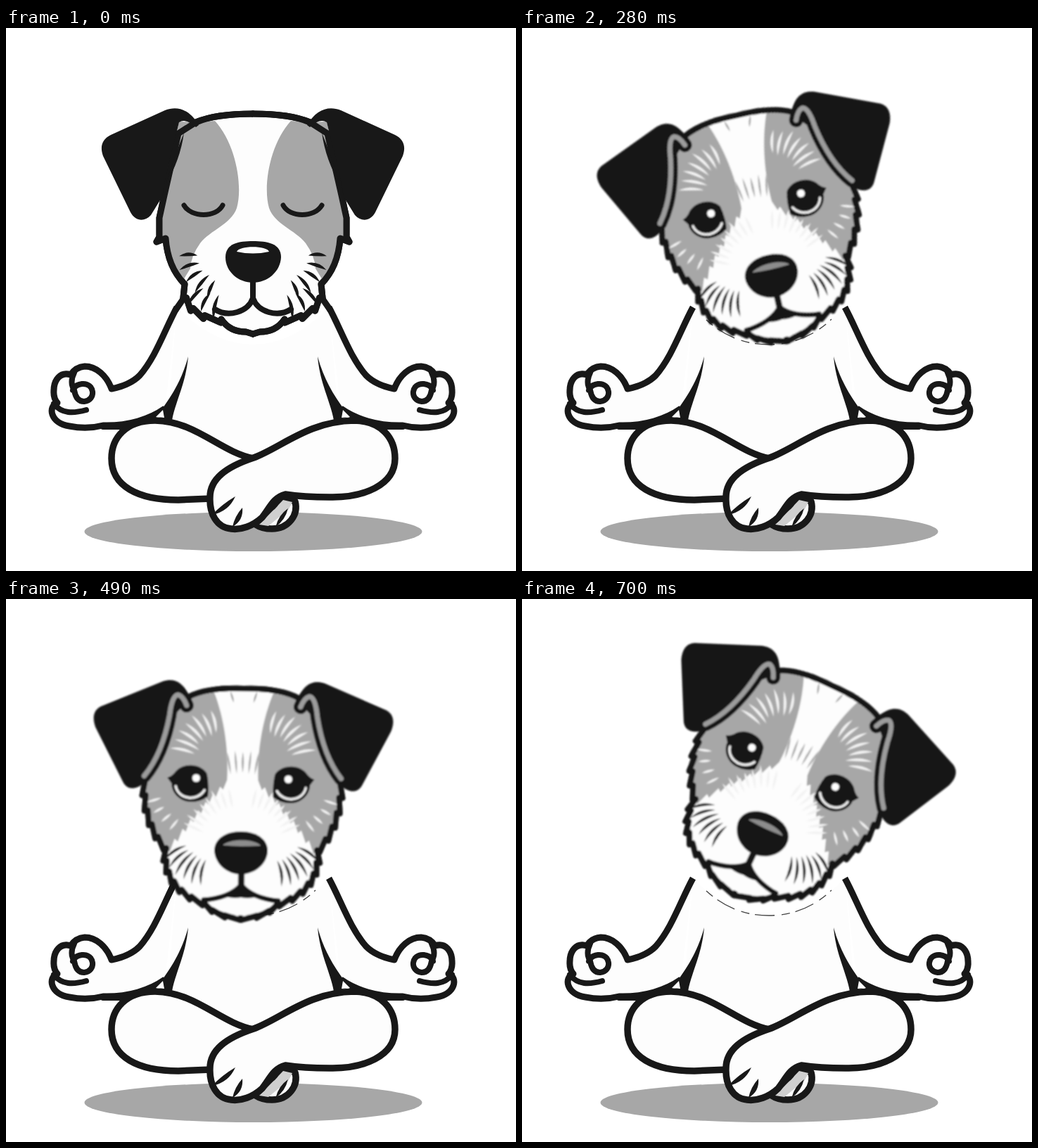
Recreate the animation shown at these times as an HTML page. Size 725 by 772 pixels, loop 770 ms.

```html
<!DOCTYPE html>
<html lang="en">
<head>
<meta charset="utf-8">
<title>Meditating dog</title>
<style>
html, body { margin: 0; height: 100%; overflow: hidden; background: #fff; }
svg { display: block; width: 100vw; height: 100vh; }
</style>
</head>
<body>
<svg id="stage" viewBox="0 0 725 772"></svg>
<script>
const INK = '#181818', FUR = '#fdfdfd', GREY = '#a7a7a7';

const fill = (d, color = INK) => `<path d="${d}" fill="${color}"/>`;
const line = (d, width = 9, color = INK, inside = 'none', cap = 'round') =>
  `<path d="${d}" fill="${inside}" stroke="${color}" stroke-width="${width}" stroke-linejoin="round" stroke-linecap="${cap}"/>`;
const mirror = (half, sum = 702) => `<g transform="matrix(-1 0 0 1 ${sum} 0)">${half}</g>`;
const both = (half, sum) => half + mirror(half, sum);

let seed = 7;
const jitter = size => {
  seed = seed * 16807 % 2147483647;
  return (seed / 2147483647 - 0.5) * size;
};

// One hair, pointed at both ends.
function hair(x, y, X, Y, width, bend = 0) {
  const len = Math.hypot(X - x, Y - y), nx = (y - Y) / len, ny = (X - x) / len;
  const via = k => `${(x + X) / 2 + nx * k} ${(y + Y) / 2 + ny * k}`;
  return `M${x} ${y}Q${via(bend + width)} ${X} ${Y}Q${via(bend - width)} ${x} ${y}Z`;
}

// Hairs spread around (x, y) between two radii and two angles in degrees.
function fan(x, y, inner, outer, from, to, count, width, color = INK, bend = 0) {
  let d = '';
  for (let i = 0; i < count; i++) {
    const a = (from + (to - from) * i / (count - 1)) * Math.PI / 180;
    const r = inner + jitter(6), R = outer + jitter(8);
    d += hair(x + r * Math.cos(a), y + r * Math.sin(a), x + R * Math.cos(a), y + R * Math.sin(a), width, bend);
  }
  return fill(d, color);
}

// Quadratic curve with teeth on its left-hand normal.
function ragged(x0, y0, cx, cy, x1, y1, teeth, depth) {
  let d = '';
  for (let i = 1; i <= teeth; i++) {
    const t = i / teeth, u = 1 - t;
    const x = u * u * x0 + 2 * u * t * cx + t * t * x1, y = u * u * y0 + 2 * u * t * cy + t * t * y1;
    const dx = u * (cx - x0) + t * (x1 - cx), dy = u * (cy - y0) + t * (y1 - cy), len = Math.hypot(dx, dy);
    d += `L${x - dy / len * depth} ${y + dx / len * depth}L${x} ${y}`;
  }
  return d;
}

function body() {
  const arm =
    line('M243 397C226 428 213 468 190 494Q176 508 150 513C143 494 128 481 112 481Q99 482 92 493C77 488 68 501 68 515Q67 526 73 533C59 538 63 562 90 566Q115 571 138 565C174 566 205 556 226 541', 9, INK, FUR, 'butt') +
    line('M97 490Q90 504 97 515C99 527 104 531 111 531C129 529 126 504 108 506Q98 507 95 515', 8) +
    line('M68 534C79 549 96 548 114 543', 8) +
    line('M138 567L175 567', 8) +
    fill('M259 467C251 497 237 522 219 545L217 553L236 558C240 533 256 505 259 467Z') +
    fill('M213 553L223 543L225 554Z', FUR);
  return `<ellipse cx="351.5" cy="716" rx="240" ry="28" fill="${GREY}"/>` +
    fill('M243 397Q295 450 351 450Q407 450 459 397L476 590L351 640L227 590Z', FUR) + both(arm) +
    line('M352 612C305 603 270 559 212 558C170 558 150 583 150 612C150 651 187 671 245 671L292 669', 9.5, INK, FUR) +
    line('M396 668L411 673C416 692 402 712 378 712Q364 712 355 706Z', 9.5, INK, FUR) +
    fill('M394 671L407 674L402 684L373 708L360 706Z', '#cfcfcf') +
    fan(430, 640, 55, 80, 124, 140, 2, 6) +
    line('M290 667C290 641 313 624 352 611C392 596 430 559 495 558C535 559 553 584 553 612C553 650 508 668 460 667C430 667 410 665 397 663C380 667 374 684 364 696C351 708 334 714 320 712C299 710 289 690 290 667Z', 9.5, INK, FUR) +
    fill(hair(293, 692, 326, 666, 7, 4) + hair(322, 709, 336, 682, 7, 3));
}

function calmHead() {
  const outline = 'M351 122C320 122 291 125 270 134L245 150L225 238L218 270V297L214 304L227 299Q230 340 254 364' +
    ragged(254, 364, 252, 408, 306, 414, 4, 5) + 'Q318 432 341 432L351 435';
  const half =
    line('M257 378L241 401') + line(outline, 9, INK, FUR) +
    fill('M297 132C327 165 337 225 328 256C320 279 291 287 276 306Q263 324 262 342L251 360C237 338 230 318 227 297L219 299L223 240L246 133L270 134Z', GREY) +
    line(outline) +
    fill('M274 138C261 116 244 110 226 117L149 152C137 158 133 168 138 182L177 262C184 275 197 276 206 266L222 240C228 200 238 168 246 134Q256 128 270 141Z') +
    fill(hair(253, 149, 227, 222, 5, -3)) +
    line('M253 252C263 270 299 270 308 252', 7) +
    line('M351 360V384C344 404 316 412 297 400', 8) +
    fan(312, 322, 38, 68, 112, 178, 5, 5, INK, 4) +
    fan(312, 335, 46, 80, 102, 132, 3, 5, INK, 5);
  return both(half) +
    fill('M351 303C371 303 391 306 391 326C390 347 371 362 351 362C331 362 312 347 312 326C312 306 331 303 351 303Z') +
    fill('M328 318C331 309 371 309 374 318Q351 323 328 318Z', FUR);
}

function alertHead() {
  const cheek = ragged(213, 252, 211, 312, 244, 350, 5, 5);
  const side = 'M351 122C321 121 293 124 272 135L248 160L213 252' + cheek +
    ragged(244, 350, 241, 406, 298, 426, 6, 5) + ragged(298, 426, 315, 446, 351, 448, 3, 3);
  const rim = 'M211 248C232 222 241 190 246 161Q249 132 258 132Q265 134 270 147';
  const eye =
    fill('M244 250Q250 248 254 243C264 228 290 228 300 243Q304 258 302 276Q287 287 270 283C257 279 250 268 250 258Z') +
    line('M256 262C260 281 287 284 297 267', 3.5, '#eee');
  const half = line(side, 8, INK, FUR) +
    fill('M309 128C322 160 331 205 329 252' + ragged(329, 252, 290, 290, 244, 352, 8, -6) +
      'Q211 312 213 252L250 150L272 136Z', GREY) +
    line(side, 8) +
    fill('M276 138C265 113 252 108 236 113L148 150C137 156 136 167 141 180L181 257C186 267 196 268 206 262L226 238Q246 200 252 145Z') +
    line(rim, 20) + line(rim, 7, '#9c9c9c') +
    fan(322, 224, 38, 74, 192, 256, 7, 4, '#f3f3f3', 4) +
    fan(300, 258, 66, 86, 128, 162, 4, 3.5, '#f3f3f3') +
    fan(350, 352, 62, 92, 205, 258, 8, 4, '#f3f3f3') +
    fan(351, 340, 98, 130, 260, 270, 3, 3, '#aaa') +
    fill(hair(332, 126, 337, 142, 3), '#aaa') +
    line('M350 384V402Q334 420 298 423', 7) +
    fill('M351 398L329 418Q340 421 351 419Z') +
    line('M299 427Q319 443 342 446', 4) +
    fan(308, 322, 42, 82, 100, 146, 6, 4, INK, 6);
  const glint = x => `<circle cx="${x}" cy="250" r="5.5" fill="#fff"/>`;
  return both(half) + both(eye, 697) + glint(285) + glint(416) +
    fill('M350 325C374 325 389 337 388 354C386 374 367 386 350 386C331 386 314 373 312 353C312 336 328 325 350 325Z') +
    fill('M324 345C334 335 370 335 378 345Q350 347 324 345Z', '#8c8c8c');
}

const stage = document.getElementById('stage');
stage.innerHTML = '<defs><filter id="soft"><feGaussianBlur stdDeviation="1"/></filter></defs>' + body() +
  `<g id="calm">${calmHead()}</g><g id="awake">` +
  '<path d="M262 415Q300 450 351 450Q402 450 440 414" fill="none" stroke="#444" stroke-width="1.4" stroke-dasharray="12 8 28 10"/>' +
  `<g id="head" filter="url(#soft)">${alertHead()}</g></g>`;
const [calm, awake, head] = ['calm', 'awake', 'head'].map(id => document.getElementById(id));

// Nose position and tilt at every second step, joined by a smooth spline.
const keys = [[350, 355, 0], [355, 352, -12.6], [341, 361, -7.6], [330, 356, 10.4], [341, 334, 25.2]];

function pose(step) {
  const i = Math.min(3, Math.floor(step / 2)), t = step / 2 - i, last = keys.length - 1;
  return keys[0].map((_, k) => {
    const b = keys[i][k], c = keys[i + 1][k];
    const a = i > 0 ? keys[i - 1][k] : 2 * b - c, d = i + 1 < last ? keys[i + 2][k] : 2 * c - b;
    return b + t / 2 * (c - a + t * (2 * a - 5 * b + 4 * c - d + t * (3 * (b - c) + d - a)));
  });
}

function draw() {
  const t = performance.now() % 770, open = t >= 140;
  calm.style.display = open ? 'none' : '';
  awake.style.display = open ? '' : 'none';
  if (open) {
    const [x, y, tilt] = pose(Math.floor((t - 140) / 70));
    head.setAttribute('transform', `translate(${x} ${y}) rotate(${tilt}) translate(-350 -355)`);
  }
  requestAnimationFrame(draw);
}
draw();
</script>
</body>
</html>
```
